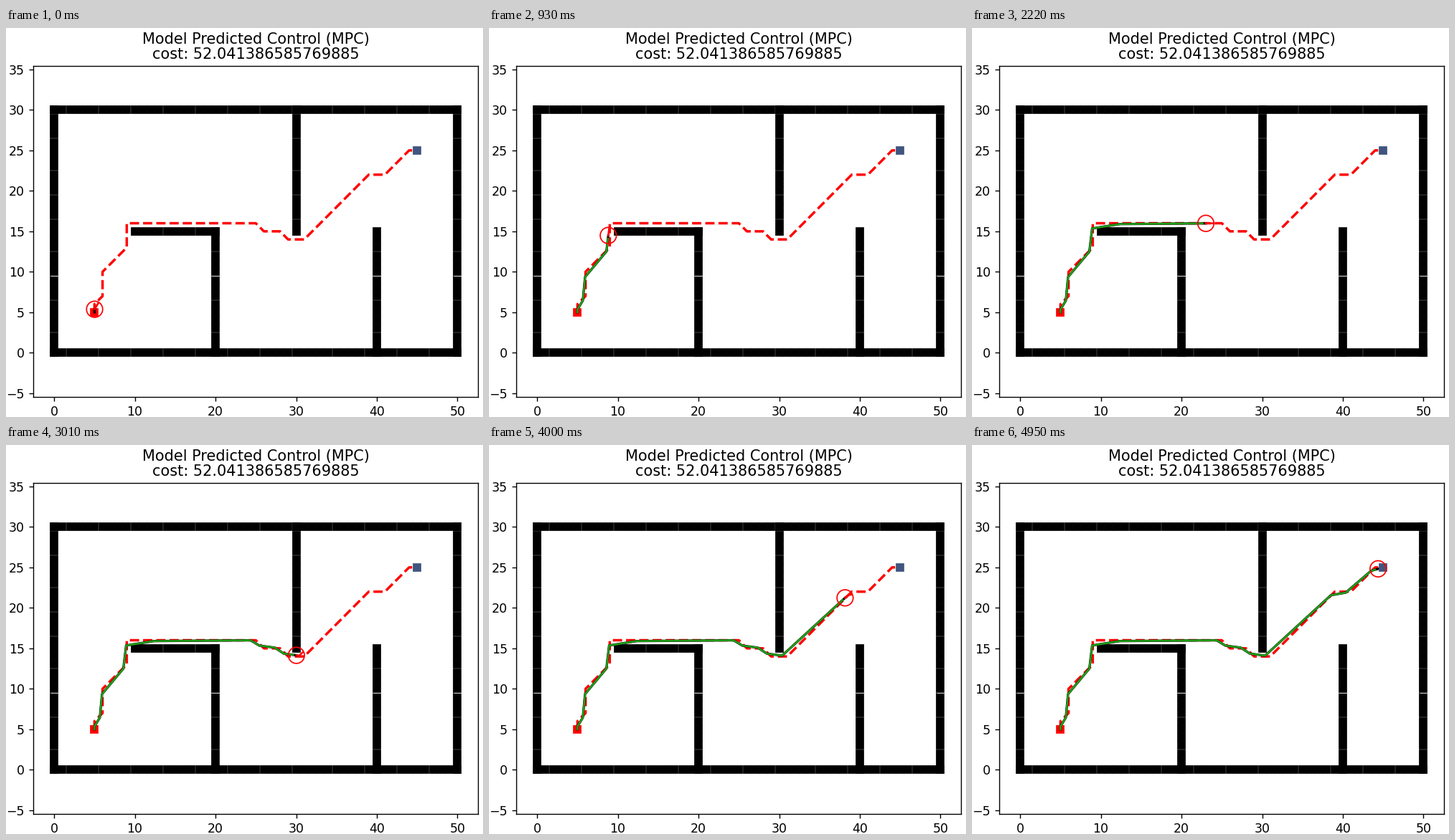
These frames come from a looping animation (665 by 543 pixels, 5.05 s). A matplotlib script:

```python
import numpy as np
import matplotlib.pyplot as plt
from matplotlib.animation import FuncAnimation
from matplotlib.patches import Circle

W, H, DPI = 665, 543, 125
LOOP, STEP = 5050, 25
LEFT, RIGHT, TOP, BOTTOM = 38, 658, 53, 515

# Planned route on the grid
ROUTE = [(5, 5), (5, 6), (6, 7), (6, 10), (9, 13), (9, 16), (13, 16), (25, 16),
         (26, 15), (28, 15), (29, 14), (31, 14), (39, 22), (41, 22), (44, 25),
         (45, 25)]
REACH = 0.65   # a waypoint counts as reached at this distance
AHEAD = 0.9    # length of the predicted path

# Progress x + y / 2 at some times in ms; equal values are pauses
PACE = {100: 7.7, 540: 12.8, 640: 12.8, 1080: 17.7, 1180: 17.7, 1690: 24.95,
        2220: 31.1, 2750: 34.75, 3010: 37.1, 3110: 37.1, 3550: 43.3,
        3830: 47.0, 4370: 52.3, 4950: 56.8}


def pursue(route):
    """Head for each waypoint in turn and stop short of it."""
    track = [np.array(route[0], float)]
    for goal in route[1:]:
        gap = goal - track[-1]
        track.append(track[-1] + gap * (1 - REACH / np.hypot(*gap)))
    return np.array(track)


TRACK = pursue(ROUTE)
DIST = np.r_[0, np.cumsum(np.hypot(*np.diff(TRACK, axis=0).T))]
TIMES = list(PACE)
DONE = np.interp(list(PACE.values()), TRACK @ (1, 0.5), DIST)


def at(s):
    """Points on the track at driven distances s."""
    return np.column_stack([np.interp(s, DIST, TRACK[:, k]) for k in (0, 1)])


def driven(s):
    return np.vstack([TRACK[DIST < s], at([s])])


def wall(x0, y0, x1, y1):
    n = max(x1 - x0, y1 - y0) + 1
    ax.plot(np.linspace(x0, x1, n), np.linspace(y0, y1, n), "sk", ms=5.8,
            snap=False)


fig = plt.figure(figsize=(W / DPI, H / DPI), dpi=DPI, facecolor="white")
ax = fig.add_axes([LEFT / W, 1 - BOTTOM / H,
                   (RIGHT - LEFT) / W, (BOTTOM - TOP) / H])
ax.set_xlim(-2.59, 52.54)
ax.set_ylim(-5.46, 35.43)
ax.set_xticks(range(0, 51, 10))
ax.set_yticks(range(-5, 36, 5))
ax.set_title("Model Predicted Control (MPC)\ncost: 52.041386585769885",
             linespacing=1.02)

for y in (0, 30):
    wall(0, y, 50, y)
for x in (0, 50):
    wall(x, 0, x, 30)
for x in (20, 40):
    wall(x, 0, x, 15)
wall(10, 15, 20, 15)
wall(30, 15, 30, 30)
for x in (0, 20, 40, 50):
    ax.plot([x - 0.5, x + 0.5], [9.53, 9.53], color="#d0d0d0", lw=0.58,
            solid_capstyle="butt")

ax.plot(*zip(*ROUTE), "--r", lw=2)
ax.plot(*ROUTE[0], "sr", ms=5.8, snap=False, zorder=3)
ax.plot(*ROUTE[-1], "s", color="#40557f", ms=5.8, snap=False, zorder=4)

shadow, = ax.plot([], [], color="black", lw=1.9, zorder=3)
trail, = ax.plot([], [], color="#22a018", lw=1.5, zorder=3)
ahead, = ax.plot([], [], color="red", lw=1.5, zorder=3)
robot = ax.add_patch(Circle((0, 0), 1, fill=False, ec="red", lw=1, zorder=5))


def draw(i):
    s = np.interp((i + 0.5) * STEP, TIMES, DONE)
    shadow.set_data(*driven(s).T)
    trail.set_data(*driven(max(s - 0.4, 0)).T)
    ahead.set_data(*at(np.linspace(s, s + AHEAD, 8)).T)
    robot.center = tuple(at([s])[0])
    return shadow, trail, ahead, robot


anim = FuncAnimation(fig, draw, frames=LOOP // STEP, interval=STEP,
                     repeat=True, repeat_delay=0)
plt.show()
```
